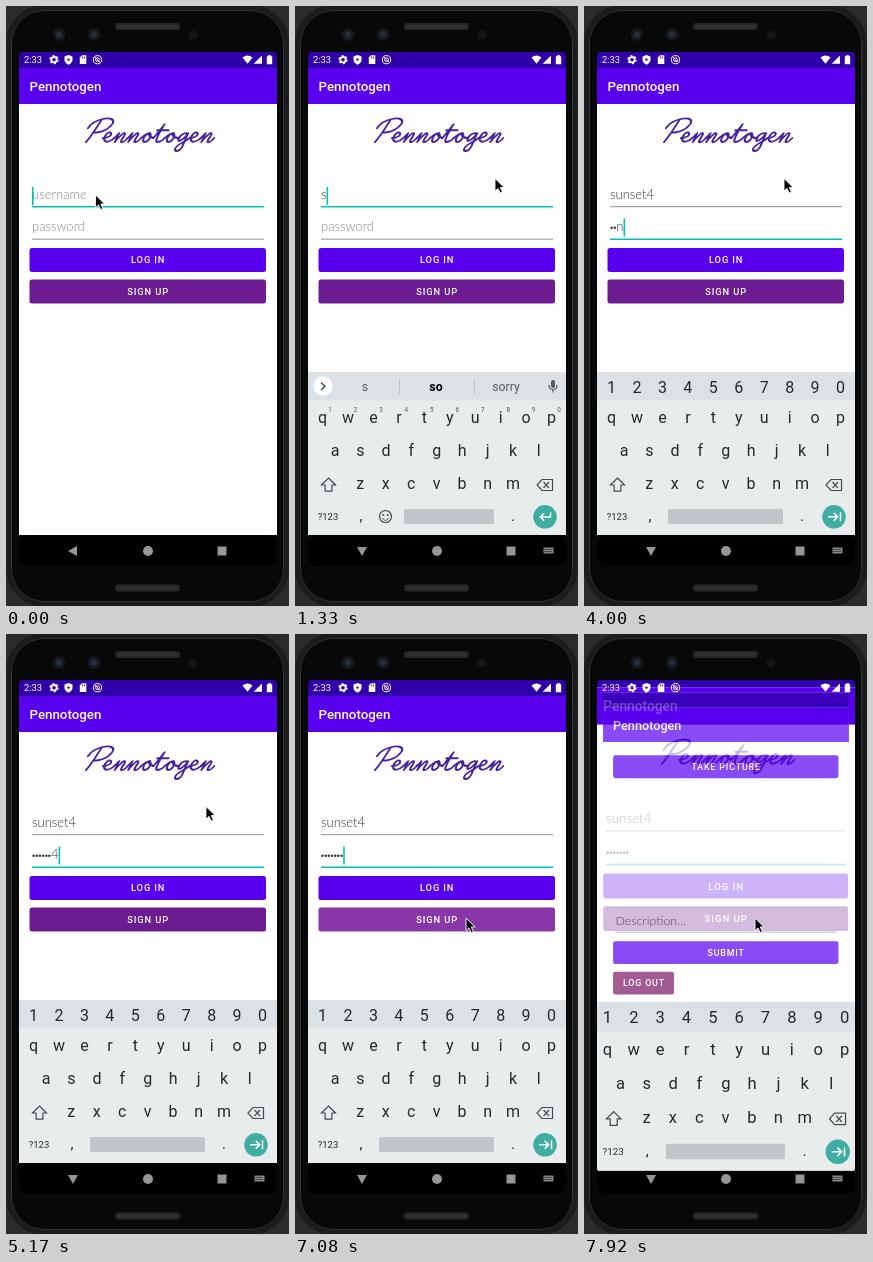
Animation of 283x600 px, one loop 8 s. Source, as an HTML page:

```html
<!DOCTYPE html>
<html lang="en">
<head>
<meta charset="utf-8">
<title>Sign-up demo</title>
<style>
  html, body { margin: 0; width: 100%; height: 100%; overflow: hidden; background: #292b2d; }
  svg { display: block; width: 100%; height: 100%; font-family: Roboto, sans-serif; }
  .hand { font: 300 13px Lato, sans-serif; }
  .caps { font-weight: 500; letter-spacing: .9px; }
</style>
</head>
<body>
<svg id="stage" viewBox="0 0 283 600"></svg>
<script>
const LOOP = 8000;
const APP = 'Pennotogen';
const USER = 'sunset4';
const USER_TIMES = [1250, 1500, 1700, 1900, 2120, 2350, 2750];
const PASS_TIMES = [3400, 3650, 3900, 4150, 4380, 4650, 5000];
const FOCUS_PASS = 3080;
const MASK_DELAY = 1500;
const SUGGESTIONS = [
  ['', '', ''], ['s', 'so', 'sorry'], ['su', 'sure', 'super'], ['sun', 'sunny', 'sunday'],
  ['suns', 'sunset', 'sunshine'], ['sunse', 'sunset', 'sunsets'],
  ['sunset', 'sunset3', "sunset4's"], ['sunset4', 'sunset3', "sunset4's"]
];
const COLORS = {
  bar: '#5800ee', status: '#3000a8', signUp: '#6c1c90', logOut: '#7d1766',
  teal: '#00c4b3', ink: '#24292e', hint: '#8a8a8a'
};

// Script letters on baseline 0, joined at y = -4: [advance, stroke]
const SCRIPT = {
  P: [17, 'M9-22C7-14 5-6 2 0M-1-14C1-25 24-28 21-18C18-11 11-9 6-10'],
  e: [11, 'M0-4C5-4 8-7 6-9C3-12 0-6 2-2C4 1 8 0 11-4'],
  n: [13, 'M0-4L3-9L2 0C4-6 8-11 9-8C9-5 6 0 9 0C11 0 12-2 13-4'],
  o: [12, 'M0-4C2-7 4-9 7-9C2-9 1 0 5 0C9 0 10-8 6-9C7-5 10-5 12-4'],
  t: [11, 'M0-4L6-18C4-10 2 0 5 0C8 0 10-2 11-4M1-12H12'],
  g: [12, 'M0-4L2-5M9-8C5-11 1-6 2-2C3 1 8-4 9-9L8 5C7 11 1 10 2 6C3 2 9 0 12-4']
};

const rect = (x, y, w, h, fill, extra = '') =>
  `<rect x="${x}" y="${y}" width="${w}" height="${h}" fill="${fill}" ${extra}/>`;
const circle = (x, y, r, fill, extra = '') =>
  `<circle cx="${x}" cy="${y}" r="${r}" fill="${fill}" ${extra}/>`;
const text = (x, y, str, size, fill, extra = '') =>
  `<text x="${x}" y="${y}" font-size="${size}" fill="${fill}" ${extra}>${str}</text>`;
const mid = (x, y, str, size, fill = COLORS.ink, extra = '') =>
  text(x, y, str, size, fill, `text-anchor="middle" ${extra}`);
const line = (d, color, width = 1, extra = '') =>
  `<path d="${d}" fill="none" stroke="${color}" stroke-width="${width}" ${extra}/>`;
const shape = (d, fill, extra = '') => `<path d="${d}" fill="${fill}" ${extra}/>`;
const group = (id, content, extra = '') => `<g id="${id}" ${extra}>${content}</g>`;
const button = (x, y, w, label, fill, id = '') =>
  rect(x, y, w, 24, fill, `rx="2.5" ${id}`) +
  mid(x + w / 2 + .4, y + 15.4, label, 9.3, '#fff', 'class="caps"');

function logo() {
  let x = 0;
  const strokes = [...APP].map(ch => {
    const [advance, d] = SCRIPT[ch];
    const out = `<path transform="translate(${x})" d="${d}"/>`;
    x += advance;
    return out;
  }).join('');
  return `<g transform="translate(78 136) skewX(-20) scale(1.03 .98)" fill="none" stroke="#46239c"
    stroke-width="2" stroke-linecap="round" stroke-linejoin="round">${strokes}</g>`;
}

const appFrame = () =>
  rect(13, 46, 258, 483, '#fff') + rect(13, 46, 258, 16, COLORS.status) +
  rect(13, 62, 258, 36, COLORS.bar) + text(23.5, 85, APP, 13.3, '#fff', 'font-weight="500"');

const loginScreen = () => appFrame() + logo() +
  text(26, 193, '', 13, '', 'id="user" class="hand"') +
  text(26, 225, '', 13, '', 'id="pass" class="hand"') +
  line('M26 200.7H258', '', 1, 'id="userLine"') + line('M26 233.2H258', '', 1, 'id="passLine"') +
  rect(0, 0, 1.6, 18, COLORS.teal, 'id="caret"') +
  button(23.5, 242, 236.5, 'LOG IN', COLORS.bar) +
  button(23.5, 273.5, 236.5, 'SIGN UP', COLORS.signUp) +
  rect(23.5, 273.5, 236.5, 24, '#fff', 'rx="2.5" id="ripple" style="mix-blend-mode:soft-light"');

const homeScreen = () => appFrame() +
  button(23.5, 112, 236.5, 'TAKE PICTURE', COLORS.bar) +
  text(26, 290, 'Description...', 13, '#555', 'class="hand"') + line('M26 297.5H258', '#999') +
  button(23.5, 307, 236.5, 'SUBMIT', COLORS.bar) +
  button(23.5, 339, 64, 'LOG OUT', COLORS.logOut);

const keyRow = (chars, x, y) =>
  [...chars].map((c, i) => mid(x + 25.45 * i, y, c, 16)).join('');

function keyboard() {
  const numbers = '1234567890';
  const suggestions = circle(28, 380, 9.7, '#fff') + line('M26 376.5l4 3.7-4 3.7', '#444', 1.4) +
    group('dividers', line('M104.5 373V388M179.5 373V388', '#bcc2c7')) +
    [70, 141, 211].map((x, i) =>
      mid(x, 384.8, '', 12.3, i === 1 ? '#000' : '#555c62', `id="word${i}" ${i === 1 ? 'font-weight="700"' : ''}`)).join('') +
    rect(256, 374, 4, 8, '#555c62', 'rx="2"') + line('M254 379c0 6 8 6 8 0M258 383.5v3', '#555c62', 1.2);
  const superscripts = [...numbers].map((n, i) => mid(35 + 25.45 * i, 406, n, 6.3, '#555')).join('');
  const emoji = circle(90.5, 510.5, 6, 'none', 'stroke="#444b50" stroke-width="1.2"') +
    circle(88.3, 509, 1, '#444b50') + circle(92.7, 509, 1, '#444b50') +
    line('M87.5 512c1 3 5 3 6 0', '#444b50');
  const enter = line('M255.5 506.5v4.5H245.5M249 507.3l-3.7 3.7 3.7 3.7', '#fff', 1.5);
  const next = line('M244 510.8H253.3M249.7 506.8l4 4-4 4M256.5 506.3v9', '#fff', 1.5);
  return rect(13, 366, 258, 163, '#e8eced') + rect(13, 366, 258, 28.5, '#dce1e6') +
    keyRow('qwertyuiop', 27.5, 417) + keyRow('asdfghjkl', 40, 450) + keyRow('zxcvbnm', 65.3, 483) +
    line('M33.5 472l7 7h-3.6v6.2h-6.8V479h-3.6z', '#444b50', 1.2) +
    line('M247 473.5h10.5v11H247l-5-5.5zM248.5 476l5.5 6M254 476l-5.5 6', '#444b50', 1.2) +
    mid(33, 514, '?123', 9.5) + mid(66, 515, ',', 15) + mid(218, 515, '.', 15) +
    rect(109, 503, 90, 15, '#c2c6ca', 'rx="1.5" id="space"') + circle(250, 510.8, 11.8, '#3fada1') +
    group('textMode', suggestions + superscripts + emoji + enter) +
    group('passMode', keyRow(numbers, 27.5, 386.7) + next);
}

const phone = () =>
  rect(2.5, 1.5, 278, 597, '#070808', 'rx="36" stroke="#1b1c1d" stroke-width="5"') +
  rect(5.5, 4.5, 272, 591, 'none', 'rx="33" stroke="#323435"') +
  [17, 578.5].map(y => rect(109, y, 65, 7, '#262727', 'rx="3"') + rect(112, y + 2, 59, 3, '#303131')).join('') +
  [53, 88].map(x => circle(x, 28.5, 6.5, '#15181c') + circle(x, 28.5, 3, '#24303f')).join('') +
  circle(187, 29, 4.5, '#141516');

const navBar = () => rect(13, 529, 258, 31, '#000', 'rx="10"') +
  shape('M62 545l9-5v10z', '#969696', 'id="back"') +
  circle(142, 545, 5, '#969696') + rect(211.5, 540.5, 9, 9, '#969696') +
  group('imeIcon', rect(248.5, 541.5, 10, 6, '#888') +
    line('M249.5 543.5h8M249.5 545.5h8', '#000', .9, 'stroke-dasharray="1 1"'));

const statusIcons = () => text(18, 57, '2:33', 9.4, '#fff') +
  circle(48, 53.7, 2.7, 'none', 'stroke="#fff" stroke-width="1.8"') +
  circle(48, 53.7, 4, 'none', 'stroke="#fff" stroke-width="1.3" stroke-dasharray="2 2.2"') +
  shape('M62.5 49l4 1.5v3q0 3.5-4 5.3-4-1.8-4-5.3v-3z', '#fff') + circle(62.5, 53.6, 1.2, COLORS.status) +
  shape('M76 49.3h4.3v8.6h-6.5v-6.3z', '#fff') + line('M76.5 50.5v2M78.5 50.5v2', COLORS.status, .8) +
  circle(91.5, 53.7, 4.1, 'none', 'stroke="#fff"') + circle(91.5, 53.7, 1.9, 'none', 'stroke="#fff"') +
  line('M89 51l5 5.5', '#fff') +
  shape('M236.5 51.5q5-4 10 0l-5 6.3z', '#fff') + shape('M256 49.5v8.3h-8.3z', '#fff') +
  shape('M262 49.2h3v1h1.2v8h-5.4v-8h1.2z', '#fff');

document.getElementById('stage').innerHTML =
  `<clipPath id="screen">${rect(13, 46, 258, 492, '#fff', 'rx="4"')}</clipPath>` + phone() + navBar() +
  `<g clip-path="url(#screen)">${group('login', loginScreen())}${group('home', homeScreen())}` +
  `${group('keys', keyboard())}${statusIcons()}</g>` +
  shape('M0 0V12.6L3 9.9 5.2 14.6 7.4 13.6 5.3 9H9.2z', '#000',
    'id="pointer" stroke="#fff" stroke-width=".9"');

const el = id => document.getElementById(id);
const set = (id, attrs) => Object.entries(attrs).forEach(([k, v]) => el(id).setAttribute(k, v));
const show = (id, on) => set(id, { visibility: on ? 'visible' : 'hidden' });
const progress = (t, start, length) => Math.min(1, Math.max(0, (t - start) / length));
const smooth = p => p * p * (3 - 2 * p);
const easeOut = p => 1 - (1 - p) ** 2;
const zoom = s => `translate(142 311) scale(${s}) translate(-142 -311)`;
const typed = (times, t) => times.filter(at => at <= t).length;

function renderFields(t) {
  const onPass = t >= FOCUS_PASS;
  const users = typed(USER_TIMES, t), passes = typed(PASS_TIMES, t);
  const lastKey = Math.max(0, ...[...USER_TIMES, FOCUS_PASS, ...PASS_TIMES].filter(at => at <= t));

  el('user').textContent = users ? USER.slice(0, users) : 'username';
  set('user', { fill: users ? '#333' : COLORS.hint });

  const visible = passes && t - lastKey < MASK_DELAY ? 1 : 0;
  el('pass').innerHTML = passes
    ? `<tspan font-weight="900" font-size="11">${'·'.repeat(passes - visible)}</tspan>${visible ? USER[passes - 1] : ''}`
    : 'password';
  set('pass', { fill: passes ? '#333' : COLORS.hint });

  const focus = on => ({ stroke: on ? COLORS.teal : '#858585', 'stroke-width': on ? 1.5 : .9 });
  set('userLine', focus(!onPass));
  set('passLine', focus(onPass));

  const count = onPass ? passes : users;
  const width = count ? el(onPass ? 'pass' : 'user').getComputedTextLength() : 0;
  set('caret', { x: 26 + width, y: onPass ? 212.5 : 181 });
  show('caret', (t - lastKey) % 1000 < 500);

  SUGGESTIONS[users].forEach((word, i) => el('word' + i).textContent = word);
  show('dividers', users > 0 && !onPass);
  show('textMode', !onPass);
  show('passMode', onPass);
  set('space', onPass ? { x: 84, width: 115 } : { x: 109, width: 90 });
}

function render(t) {
  renderFields(t);

  const rise = easeOut(progress(t, 200, 250));
  const open = easeOut(progress(t, 7700, 220));
  const oldZoom = zoom(1 + .035 * open);
  set('login', { transform: oldZoom });
  set('home', { transform: zoom(.85 + .103 * open), opacity: .7 * open });
  set('keys', { transform: `${oldZoom} translate(0 ${172 * (1 - rise)})` });
  set('back', { transform: rise ? 'rotate(-90 67 545)' : '' });
  show('imeIcon', rise > 0);

  const press = progress(t, 6920, 120) * (1 - progress(t, 7250, 300));
  set('ripple', { opacity: .5 * press });

  const away = smooth(progress(t, 520, 480));
  const toSignUp = smooth(progress(t, 5250, 650));
  set('pointer', {
    transform: `translate(${89.5 + 110.5 * away - 29 * toSignUp} ${189 - 16.5 * away + 111.5 * toSignUp})`
  });
}

const start = performance.now();
function tick() {
  render((performance.now() - start) % LOOP);
  requestAnimationFrame(tick);
}
tick();
</script>
</body>
</html>
```
